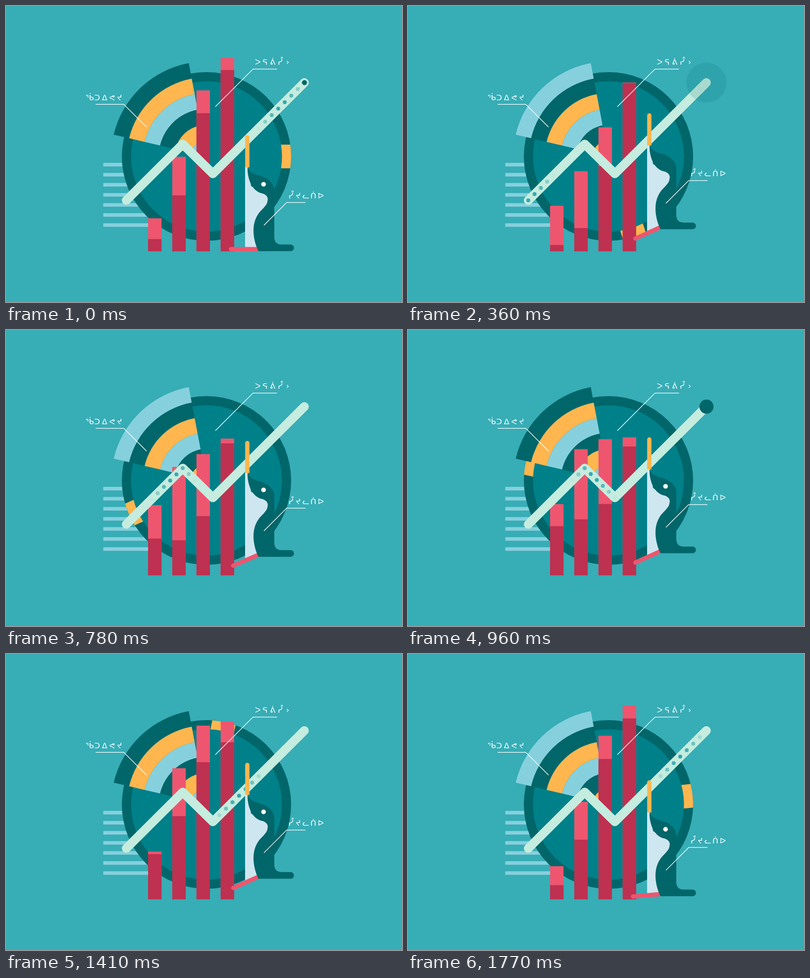
Animation of 800 by 600 pixels, one loop 1800 ms. Source, as an HTML page with a canvas:

```html
<!DOCTYPE html>
<html lang="iu">
<head>
<meta charset="utf-8">
<style>
html, body { margin: 0; width: 100%; height: 100%; overflow: hidden; background: #37adb6; }
canvas { display: block; }
</style>
</head>
<body>
<canvas id="stage" width="800" height="600"></canvas>
<script>
const ctx = document.getElementById('stage').getContext('2d');
const DARK = '#006669', DISC = '#008089', BG = '#37adb6', SKY = '#86d0dd', GOLD = '#ffb64f';
const RED = '#be3150', PINK = '#ee566f', MINT = '#c5ecde', BELLY = '#cee6f0', WHITE = '#fff';
const CX = 405, CY = 305, OUTER = 171, INNER = 152.5, FLOOR = 497.3;
const TAU = Math.PI * 2, DEG = Math.PI / 180;

// Lowest and highest column heights; each column follows the one before it
const columns = [
  { color: PINK, low: [67, 162, 236, 276], high: [145, 275, 354, 393], delay: i => 10.8 * i ** 0.87 },
  { color: RED, low: [10, 43, 118, 261], high: [108, 169, 295, 368], delay: i => 8.3 + 7.7 * i }
];
const trend = [[243, 394], [357, 280], [418, 340], [602.7, 155.3]];
const corners = [0, 9, 14, 28]; // dot number at each bend of the trend

const body = new Path2D(`M488 326 C490 336 500 341 512 344 C529 348 542 360 542 374
  V468 Q542 483.5 557 483.5 H575 A6.75 6.75 0 0 1 575 497 H510
  C501 478 500 462 500 455 C500 438 506 424 515 415 C523 407 529 400 529 393
  C529 386 525 382 518 380 C497 376 487 350 488 326 Z`);

function rect(color, x, y, w, h) {
  ctx.fillStyle = color;
  ctx.fillRect(x, y, w, h);
}

function pill(color, x, y, w, h, radii) {
  ctx.fillStyle = color;
  ctx.beginPath();
  ctx.roundRect(x, y, w, h, radii);
  ctx.fill();
}

function disc(color, x, y, r) {
  ctx.fillStyle = color;
  ctx.beginPath();
  ctx.arc(x, y, r, 0, TAU);
  ctx.fill();
}

// Ring piece from angle a to b outside, and from c to d inside
function band(color, r, a, b, inner, c = a, d = b) {
  ctx.fillStyle = color;
  ctx.beginPath();
  ctx.arc(CX, CY, r, a, b);
  ctx.arc(CX, CY, inner, d, c, true);
  ctx.fill();
}

function line(color, width, points, cap = 'butt') {
  ctx.strokeStyle = color;
  ctx.lineWidth = width;
  ctx.lineCap = cap;
  ctx.lineJoin = cap === 'round' ? 'round' : 'miter';
  ctx.beginPath();
  points.forEach(p => ctx.lineTo(...p));
  ctx.stroke();
}

// Spaced text over a pointer: rule from x1 to x2, then a diagonal to the tip
function label(text, x, baseline, x1, x2, tipX, tipY) {
  ctx.fillStyle = WHITE;
  ctx.font = "16px 'DejaVu Sans', 'Noto Sans', sans-serif";
  ctx.textAlign = 'center';
  [...text].forEach((glyph, i) => ctx.fillText(glyph, x + i * 15.1, baseline));
  const y = baseline + 8.5;
  line(WHITE, 1.3, [[x1, y], [x2, y], [tipX, tipY]]);
}

const ease = p => p ** 1.8 / (p ** 1.8 + (1 - p) ** 1.8);

function swing(tick, low, high, delay) {
  const q = ((tick - delay + 60) % 60) / 30;
  return low + (high - low) * ease(q < 1 ? q : 2 - q);
}

function drawDial(tick) {
  for (let i = 0; i < 7; i++) rect(SKY, 196.5, 318 + i * 20.4, 120, 7.2);
  disc(DARK, CX, CY, OUTER);
  disc(DISC, CX, CY, INNER);

  const turn = tick * 6 * DEG;
  const out = Math.asin(24 / OUTER), inn = Math.asin(24 / INNER);
  band(GOLD, OUTER, turn - out, turn + out, INNER, turn - inn, turn + inn);

  const shift = Math.floor(tick / 5);
  for (let i = 0; i < 6; i++) {
    const r = 32.1 * (6 - i);
    band([DARK, GOLD, SKY][(i + shift) % 3], r, 193.3 * DEG, 259.3 * DEG, r - 32.1);
  }
}

function drawColumns(tick) {
  for (const { color, low, high, delay } of columns) {
    for (let i = 0; i < 4; i++) {
      const h = swing(tick, low[i], high[i], delay(i));
      rect(color, 287 + i * 48.9, FLOOR - h, 27.2, h);
    }
  }
}

function trendPoint(i) {
  const k = corners.findIndex(c => c > i);
  const p = (i - corners[k - 1]) / (corners[k] - corners[k - 1]);
  return trend[k].map((end, axis) => trend[k - 1][axis] * (1 - p) + end * p);
}

function drawTrend(tick) {
  line(MINT, 18, trend, 'round');
  const head = (tick - 11) / 2;
  for (let i = 0; i < 28; i++) {
    const d = Math.abs((head - i + 45) % 30 - 15);
    ctx.globalAlpha = Math.max(0, 1 - (d / 3.6) ** 1.5);
    disc('#30a5b0', ...trendPoint(i), 4);
  }
  const left = Math.max(0, 16 - (tick + 1) % 30);
  ctx.globalAlpha = Math.min(1, (left / 13) ** 1.35);
  disc(DARK, 603, 155.3, 42 * (1 - (left / 16) ** 2));
  ctx.globalAlpha = 1;
}

function drawBird(tick) {
  const hop = Math.sin(Math.PI * (tick % 20) / 20) ** 1.1;
  const tilt = 24.6 * DEG * Math.sin(hop * Math.PI / 2);
  ctx.save();
  ctx.translate(0, -47 * hop);

  ctx.fillStyle = BELLY;
  ctx.beginPath();
  ctx.moveTo(483, 326);
  ctx.lineTo(488.5, 326);
  ctx.lineTo(495, 365);
  ctx.lineTo(530, 385);
  ctx.lineTo(512, 492);
  ctx.lineTo(483, 491 + Math.tan(tilt) * 27);
  ctx.fill();

  ctx.save();
  ctx.translate(510, 492.8);
  ctx.rotate(-tilt);
  pill(PINK, -60, -4.3, 61, 8.6, [4.3, 0, 0, 4.3]);
  ctx.restore();

  ctx.fillStyle = DARK;
  ctx.fill(body);
  pill(GOLD, 483.2, 262, 8.6, 65, [4.3, 4.3, 0, 0]);
  const blink = tick >= 10 && tick <= 14;
  if (!blink) disc(WHITE, 520.3, 361.4, 4.7);

  label('ᓮᔪᓚᑏᐅ', 575.5, 389.8, 605, 567, 521, 444.5);
  ctx.restore();
}

function draw(now) {
  const tick = Math.floor(now / 30) % 60;
  rect(BG, 0, 0, 800, 600);
  drawDial(tick);
  drawColumns(tick);
  drawTrend(tick);
  label('ᖄᑐᐃᕙᔪ', 169, 190.8, 181, 238, 284, 245.5);
  label('ᐳᕋᕖᓮ›', 508.5, 119.3, 547.5, 499, 423, 204);
  drawBird(tick);
}

function loop(now) {
  draw(now);
  requestAnimationFrame(loop);
}
draw(0);
requestAnimationFrame(loop);
</script>
</body>
</html>
```
